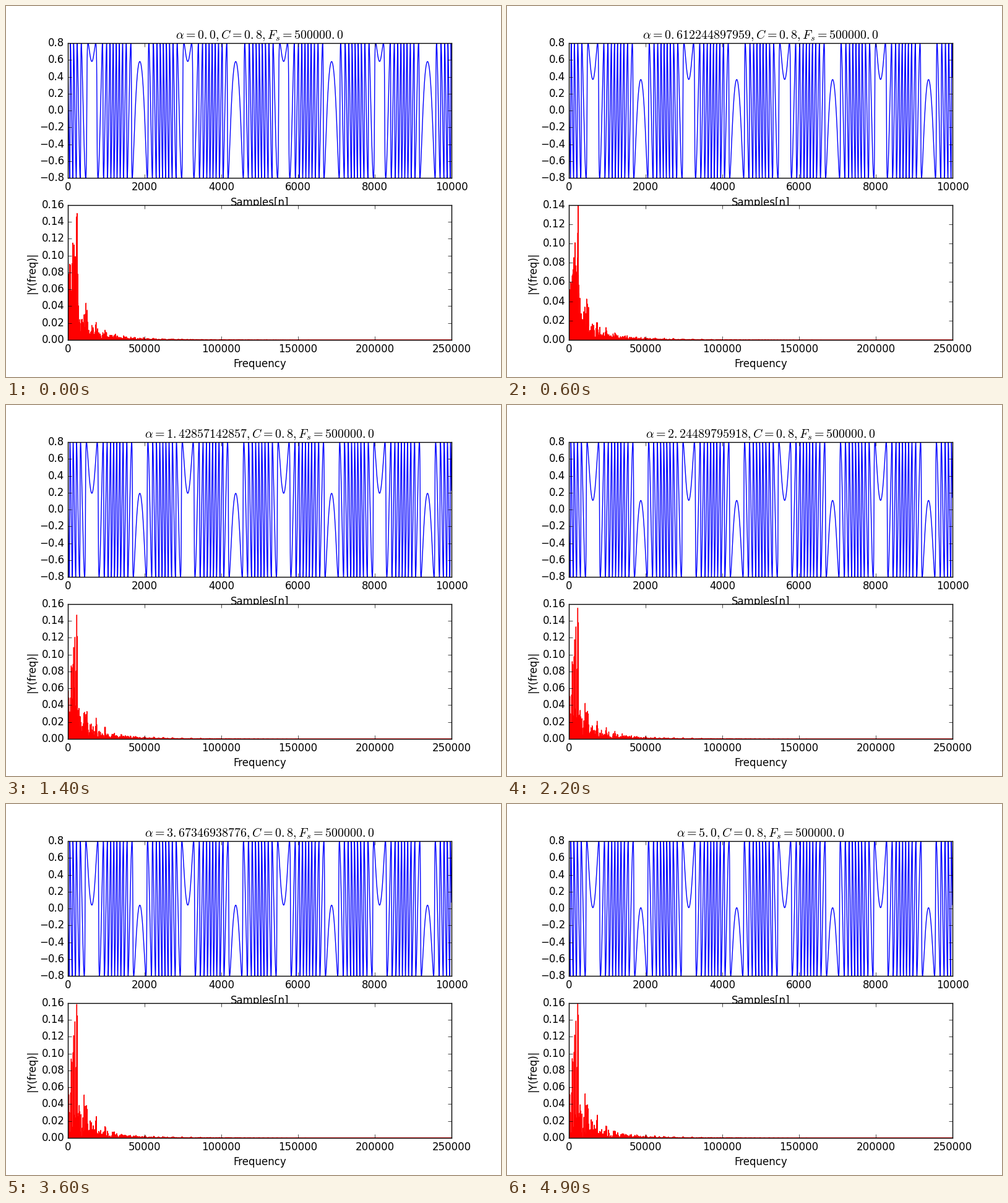
A matplotlib script that plays this animation: 800x600 px, repeating every 5000 ms.

```python
import numpy as np
import matplotlib.pyplot as plt
from matplotlib.animation import FuncAnimation

plt.style.use("classic")
plt.rcParams["font.family"] = "DejaVu Sans"

FS = 500000.0        # sampling rate, Hz
N = 10000            # samples
C = 0.8              # feedback strength
MOD_FREQ = 200.0     # target vibration, Hz
DEPTH = 10 * np.pi   # phase modulation depth
OFFSET = 5 * np.pi / 9
FRAMES = 50
STEP = 0.02          # spectrum tick spacing

samples = np.arange(N)
freqs = samples[:N // 2] * FS / N
modulation = DEPTH * np.sin(2 * np.pi * MOD_FREQ * samples / FS)
alphas = np.linspace(0, 5, FRAMES)


def feedback_signal(alpha):
    """Solve e - C sin(e) = m by Newton's method and return C sin(e)."""
    m = np.mod(OFFSET + np.arctan(alpha) + modulation, 2 * np.pi)
    e = np.full(N, np.pi)
    for _ in range(25):
        e -= (e - C * np.sin(e) - m) / (1 - C * np.cos(e))
    return C * np.sin(e)


def spaced(value):
    """Number as math text with a thin gap after the decimal point."""
    text = "%.12g" % value
    if "." not in text:
        text += ".0"
    return text.replace(".", "{.}")


fig, (wave_ax, spec_ax) = plt.subplots(2, 1, figsize=(8, 6), dpi=100,
                                       facecolor="white")

wave, = wave_ax.plot([], [], "b")
wave_ax.set_xlim(0, N)
wave_ax.set_ylim(-C, C)
wave_ax.set_xticks(np.arange(0, N + 1, 2000))
wave_ax.set_yticks(np.arange(-4, 5) / 5)
wave_ax.set_xlabel("Samples[n]")
title = wave_ax.set_title("", y=1.0)

spectrum, = spec_ax.plot([], [], "r")
spec_ax.set_xlim(0, FS / 2)
spec_ax.set_xticks(np.arange(0, 250001, 50000))
spec_ax.set_xlabel("Frequency")
spec_ax.set_ylabel("|Y(freq)|")


def update(i):
    y = feedback_signal(alphas[i])
    magnitude = np.abs(np.fft.fft(y) / N)[:N // 2]
    wave.set_data(samples, y)
    spectrum.set_data(freqs, magnitude)

    steps = int(np.ceil(magnitude.max() / STEP))
    spec_ax.set_yticks(np.arange(steps + 1) * STEP)
    spec_ax.set_ylim(0, steps * STEP)

    title.set_text(r"$\alpha=%s, C=%s, F_s=%s$"
                   % (spaced(alphas[i]), spaced(C), spaced(FS)))
    return wave, spectrum, title


anim = FuncAnimation(fig, update, frames=FRAMES, interval=100,
                     init_func=lambda: update(0), repeat=True, blit=False)
plt.show()
```
